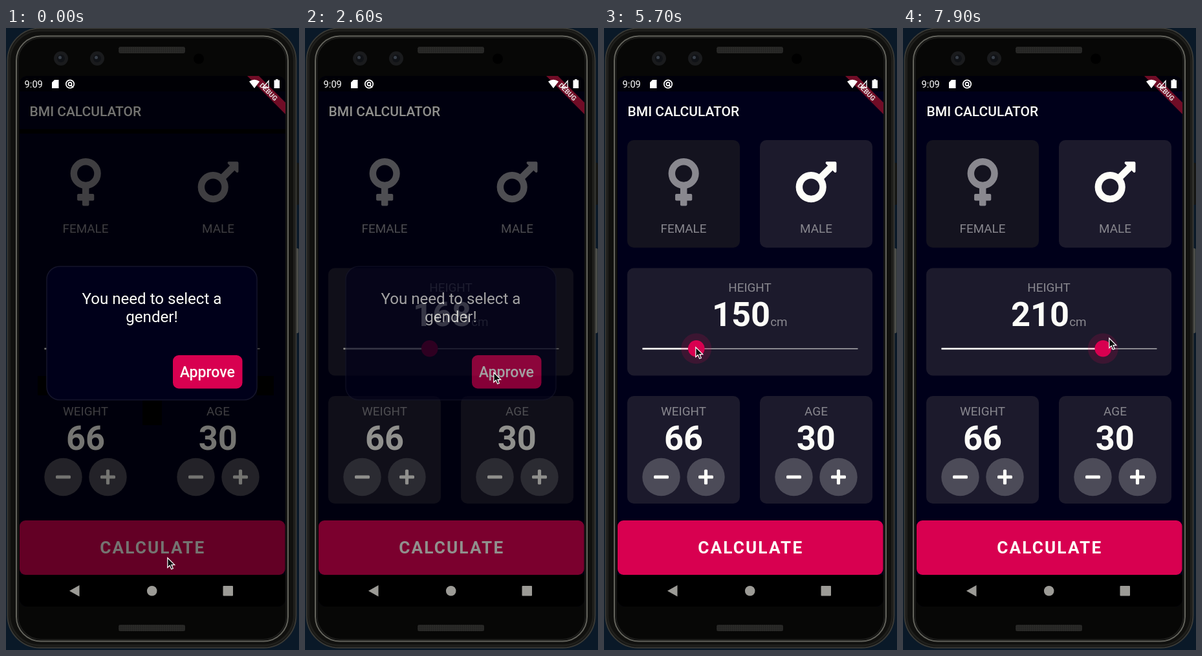
Animation, 453 px wide and 960 px high, one loop 8 s. Source, as an HTML page:

```html
<!DOCTYPE html>
<html lang="en">
<head>
<meta charset="utf-8">
<title>BMI calculator</title>
<style>
html, body { margin: 0; height: 100%; overflow: hidden; background: #0a1928; }
svg { display: block; width: 100vw; height: 100vh; }
text { font-family: Roboto, "Open Sans", sans-serif; text-anchor: middle; }
.label { font-size: 18.86px; fill: #89888f; }
.num { font-size: 52.4px; font-weight: 700; fill: #fdfdf8; }
.start { text-anchor: start; }
.card { fill: #1c1a2c; }
.off { fill: #14131f; }
.pink { fill: #d80050; }
</style>
</head>
<body>
<svg viewBox="0 0 453 960">
  <defs>
    <clipPath id="glass"><rect x="21" y="74" width="411" height="819" rx="12"/></clipPath>
    <pattern id="mesh" width="3" height="3" patternUnits="userSpaceOnUse">
      <rect width="3" height="3" fill="#2b2b29"/><rect width="1.5" height="1.5" fill="#1b1b1a"/>
    </pattern>
    <g id="minus"><circle r="29.2" fill="#4c4b58"/><rect x="-11.5" y="-2.6" width="23" height="5.2" rx="1.6" fill="#fdfdf8"/></g>
    <g id="plus"><use href="#minus"/><rect x="-2.6" y="-11.5" width="5.2" height="23" rx="1.6" fill="#fdfdf8"/></g>
  </defs>

  <!-- phone body -->
  <rect x="446" y="208" width="7" height="65" rx="2" fill="#151614"/>
  <rect x="446" y="340" width="6.5" height="131" rx="2" fill="#4d4e4a"/>
  <rect x="2.5" y=".5" width="446" height="956" rx="50" fill="#10100e" stroke="#3a3a36" stroke-width="2"/>
  <rect x="5.5" y="4" width="440" height="949" rx="47" fill="none" stroke="#1f1f1c" stroke-width="3"/>
  <rect x="16" y="12.5" width="420" height="934" rx="38" fill="#070706" stroke="#64645d" stroke-width="2"/>
  <rect x="18.5" y="15" width="415" height="929" rx="36" fill="none" stroke="#1b1b19" stroke-width="2"/>
  <rect x="174" y="29" width="103" height="10" rx="3" fill="url(#mesh)"/>
  <rect x="174" y="921" width="103" height="10" rx="3" fill="url(#mesh)"/>
  <g id="lens"><circle cx="85" cy="47" r="11" fill="#1a1b1d"/><circle cx="85" cy="47" r="6" fill="#101216"/><circle cx="83.5" cy="45.5" r="2.5" fill="#39404a"/></g>
  <use href="#lens" x="56"/>
  <circle cx="298" cy="47.5" r="8" fill="#000"/>

  <g clip-path="url(#glass)">
    <rect x="20" y="74" width="413" height="820" fill="#00001a"/>
    <text class="start" x="36.6" y="136" font-size="20.95" font-weight="500" fill="#fdfdf8">BMI CALCULATOR</text>

    <g id="pale" class="off">
      <rect x="36" y="173" width="174" height="166" rx="10"/>
      <rect id="maleCard" x="241" y="173" width="174" height="166" rx="10"/>
    </g>
    <g id="solid" class="card">
      <rect x="36" y="370.5" width="379" height="166" rx="10"/>
      <rect x="36" y="568" width="174" height="166" rx="10"/>
      <rect x="241" y="568" width="174" height="166" rx="10"/>
    </g>

    <g transform="translate(99.6 195.8) scale(.1637)" fill="#89888f">
      <circle cx="144" cy="176" r="112" fill="none" stroke="#89888f" stroke-width="64"/>
      <rect x="112" y="300" width="64" height="180" rx="12"/>
      <rect x="64" y="368" width="160" height="64" rx="12"/>
    </g>
    <g id="male" transform="translate(296.6 195.8) scale(.1637)">
      <g fill="none" stroke="currentColor" stroke-width="64">
        <circle cx="144" cy="304" r="112"/><path d="M228 220L328 120"/>
      </g>
      <path fill="currentColor" d="M372 64h-79c-10.7 0-16 12.9-8.5 20.4l79 79c7.5 7.6 20.4 2.2 20.4-8.5V76c0-6.6-5.4-12-12-12z"/>
    </g>
    <text class="label" x="123" y="316">FEMALE</text>
    <text class="label" x="328" y="316">MALE</text>

    <text class="label" x="225.5" y="407">HEIGHT</text>
    <text class="num start" id="height" x="167" y="459.5"></text>
    <text class="label start" x="257.2" y="459.5">cm</text>
    <rect x="59.5" y="494" width="333" height="2" fill="#89888f"/>
    <rect id="done" x="59.5" y="493.7" height="2.6" fill="#fdfdf8"/>
    <g id="thumb" class="pink"><circle id="halo" r="23.5" opacity=".17"/><circle r="12.8"/></g>

    <text class="label" x="123" y="597.5">WEIGHT</text>
    <text class="label" x="328" y="597.5">AGE</text>
    <text class="num" x="123" y="650.5">66</text>
    <text class="num" x="327.7" y="650.5">30</text>
    <use href="#minus" x="88.5" y="693"/><use href="#plus" x="157.5" y="693"/>
    <use href="#minus" x="293.5" y="693"/><use href="#plus" x="362.5" y="693"/>

    <rect class="pink" x="21" y="760" width="410.5" height="84" rx="9"/>
    <text x="226.8" y="810.5" font-size="26.2" font-weight="700" letter-spacing="2.1" fill="#fdfdf8">CALCULATE</text>

    <rect id="dim" x="20" y="74" width="413" height="771"/>
    <path id="shade" d="M21 156h411v7H21zM49 537h15v30H49zM388 537h26v30h-26zM211 575h30v38h-30z"/>

    <g id="dialog">
      <rect x="63" y="368" width="325" height="206" rx="20" fill="#00001a" stroke="#15152b" stroke-width="1.5"/>
      <g font-size="24.1" fill="#fdfdf8">
        <text x="225.5" y="425.5">You need to select a</text>
        <text x="225.5" y="454">gender!</text>
      </g>
      <rect class="pink" x="258" y="505" width="107.5" height="51.5" rx="9"/>
      <text x="311.3" y="539" font-size="23.05" font-weight="500" fill="#fdfdf8">Approve</text>
    </g>

    <!-- system bars -->
    <rect x="20" y="74" width="413" height="24" fill="#000" opacity=".6"/>
    <path d="M373 74h18l41 41v18z" fill="#700c26"/>
    <text transform="translate(406 98.5) rotate(45)" y="3.8" font-size="10.6" font-weight="700" fill="#e4dcdc">DEBUG</text>
    <g fill="#fff">
      <text class="start" x="28.6" y="92" font-size="14.67">9:09</text>
      <path d="M75 80h6.5v13H71V84z"/>
      <path d="M376 82.5q8-5.5 16 0L384 93z"/>
      <path d="M414.5 80.5h2.5V79h3.5v1.5h2.5V93h-8.500z"/>
    </g>
    <g fill="none" stroke="#fff" stroke-width="1.7">
      <circle cx="99" cy="86.500" r="6.200"/><circle cx="99" cy="86.500" r="2.600"/><path d="M100 88l4 4"/>
      <path d="M397.500 92L406 81.500V92z" stroke-width="1.300"/>
    </g>
    <rect x="20" y="844" width="413" height="50" fill="#000"/>
    <g fill="#9c9b96">
      <path d="M98 868.700L113.500 860v17.500z"/>
      <circle cx="225.700" cy="868.700" r="7.800"/>
      <rect x="335.500" y="861" width="15.500" height="15.500" rx="1"/>
    </g>
  </g>

  <path id="cursor" d="M.8 .8V15.800L4.200 12.600L6.700 18.300L9.300 17.200L6.900 11.600H11.700Z" fill="#0a0a0a" stroke="#fff" stroke-width="1.200"/>
</svg>
<script>
const $ = id => document.getElementById(id);
const LOOP = 8000, STEP = 100, TRACK = 59.5, PER_CM = 2.775, MIN_CM = 120;

// Keys: time, then values
const pointer = [
  [200, 249, 817], [300, 256, 775], [600, 291, 571], [700, 291, 571],
  [1000, 299, 515], [1200, 291, 531], [2600, 291, 531], [3200, 301, 283],
  [4000, 301, 283], [4200, 316, 500], [4300, 316, 500], [4500, 245, 474],
  [4700, 187, 487], [4800, 187, 487], [4900, 199, 492], [5000, 199, 492],
  [5700, 141, 492], [5900, 106, 491], [6100, 64, 490], [6200, 64, 490],
  [6300, 54, 490], [6500, 54, 490], [7000, 206, 478], [7400, 318, 478],
  [7600, 343, 478], [7800, 343, 478], [7900, 318, 478]
];
const centimetres = [
  [5100, 168], [5700, 150], [5900, 137], [6100, 122], [6200, 122], [6300, 120],
  [6500, 120], [7000, 176], [7400, 209], [7600, 218], [7800, 218], [7900, 210]
];
const fade = [[2500, .54, 1], [2600, .43, .62], [2700, 0, 0]];

function at(keys, t) {
  const i = keys.findIndex(k => k[0] >= t);
  if (i < 1) return (i ? keys[keys.length - 1] : keys[0]).slice(1);
  const a = keys[i - 1], b = keys[i], p = (t - a[0]) / (b[0] - a[0]);
  return a.slice(1).map((v, j) => v + (b[j + 1] - v) * p);
}

const set = (id, name, value) => $(id).setAttribute(name, value);
const show = (id, on) => set(id, "visibility", on ? "visible" : "hidden");

function draw(now) {
  const t = Math.floor(now % LOOP / STEP) * STEP;
  const [x, y] = at(pointer, t);
  const cm = Math.round(at(centimetres, t)[0]);
  const [dim, dialog] = at(fade, t);
  const slide = (cm - MIN_CM) * PER_CM;
  const male = t >= 3600;

  set("cursor", "transform", `translate(${x} ${y})`);
  $("height").textContent = cm;
  set("done", "width", slide);
  set("thumb", "transform", `translate(${TRACK + slide} 494.8)`);
  show("halo", t >= 5100);
  set("dim", "opacity", dim);
  set("dialog", "opacity", dialog);
  show("shade", t < 2600);
  show("solid", t >= 2600);
  show("pale", t >= 2700);
  set("maleCard", "class", male ? "card" : "off");
  set("male", "color", male ? "#fdfdf8" : "#89888f");
  requestAnimationFrame(draw);
}
draw(0);
</script>
</body>
</html>
```
